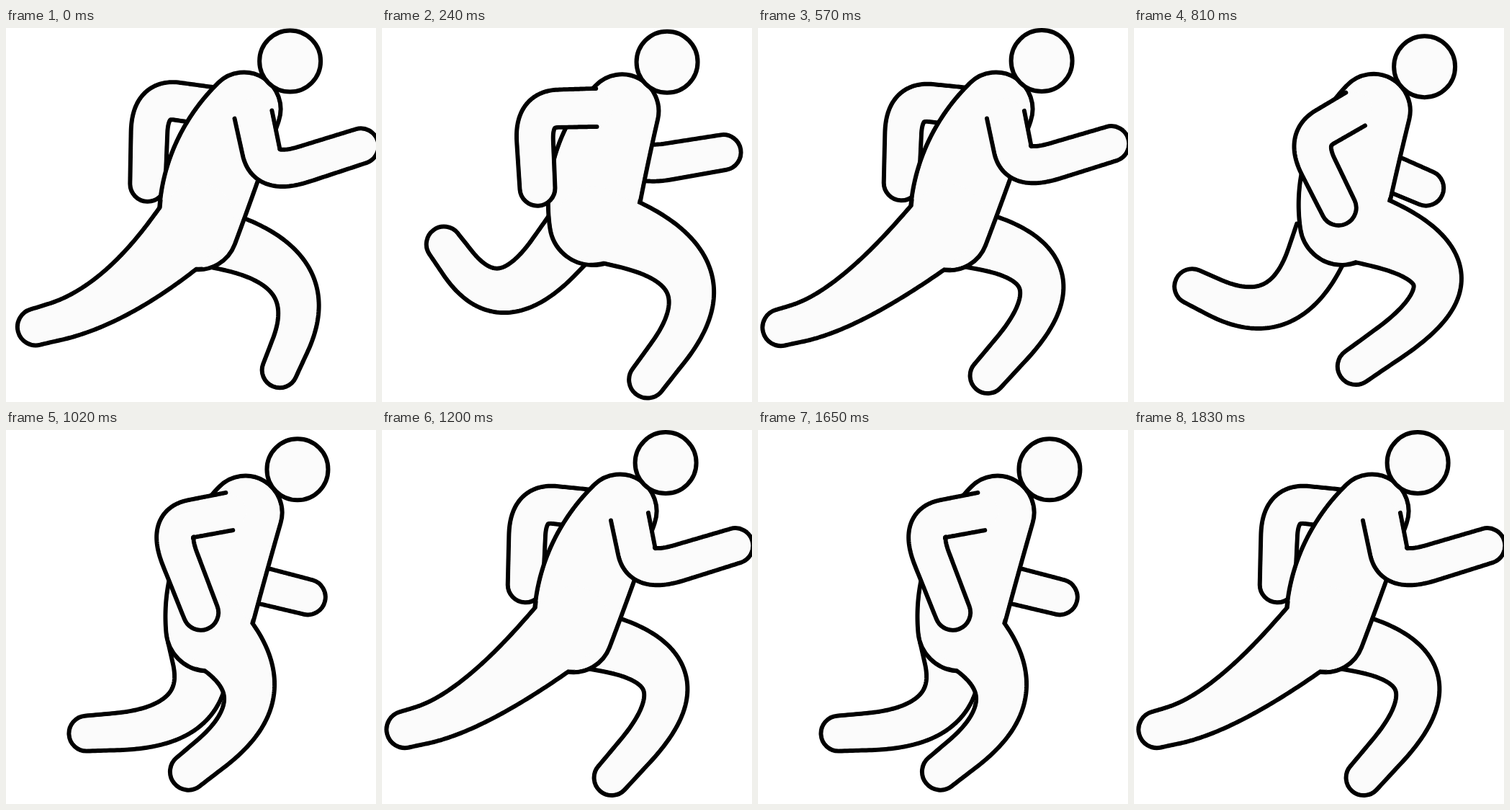
Animation, 514 px wide and 519 px high, one loop 1860 ms. Source, as an HTML page:

```html
<!DOCTYPE html>
<html lang="en">
<head>
<meta charset="utf-8">
<title>Running figure</title>
<style>
  html, body { margin: 0; width: 100%; height: 100%; overflow: hidden; background: #fff; }
  svg { display: block; width: 100%; height: 100%; }
</style>
</head>
<body>
<svg id="stage" viewBox="0 0 514 519"></svg>
<script>
const STEP = 30, LOOP_STEPS = 62, CYCLE_STEPS = 21, PHASES = 20;
const FULL_STRETCH = 19.3;   // phase at which the stride is longest
const INK = '#000', SKIN = '#fbfbfb', LINE = 6;
const SAMPLES = 90;

const angle = (phase, origin) => 2 * Math.PI * (phase - origin) / PHASES;

// A cyclic motion: a swing, a lead or lag, and a bob twice per stride.
function motionAt(phase) {
  const a = angle(phase, FULL_STRETCH);
  return (mean, swing, lead = 0, bob = 0) =>
    mean + swing * Math.cos(a) + lead * Math.sin(a) + bob * Math.cos(2 * a);
}

function trunkPose(phase) {
  const m = motionAt(phase);
  return {
    head: [m(400.5, 0, 0, -6.5), m(51, 0, 0, -5.5)],
    shoulder: [m(332, -1.5), m(114, -1.5)],
    pelvis: [m(279, -13, 4), m(276, 6, -3)],
    girth: m(57, -3)
  };
}

function armPose(phase) {
  const m = motionAt(phase);
  return [
    [m(320, 24), m(115, 5)],
    [m(272, 80, 12, 10), m(160, 52, 18, -10)],
    [m(345, 148, 17), m(220, -27, 0, -33)]
  ];
}

function nearLegPose(phase, pelvis) {
  const m = motionAt(phase);
  return [
    [pelvis[0], pelvis[1] - m(8, 8)],
    [m(338, -165, 60, -44), m(366, 24, -18)],
    [m(204, -171, 20), m(454, -39, -5)]
  ];
}

function farLegPose(phase) {
  const m = motionAt(phase);
  const kick = Math.cos(angle(phase, 0.4) / 2) ** 12;
  return [
    [266, 285],
    [m(308, 142, -33), m(387, -35, 5, -21)],
    [m(97, 4, -18) + 290 * kick, m(415, 93, -26, -28)]
  ];
}

// Samples a tapering tube; softness is the share of it taken by the bend.
function tube([root, joint, end], [r0, r1, r2], softness) {
  const straight = (1 - softness) / 2;
  const along = (t, axis) => {
    const h = root[axis], k = joint[axis], f = end[axis];
    if (t < straight) return h + 2 * t * (k - h);
    if (t > 1 - straight) return f + 2 * (1 - t) * (k - f);
    const u = (t - straight) / softness;
    return k + softness * ((1 - u) ** 2 * (h - k) + u * u * (f - k));
  };
  return Array.from({ length: SAMPLES + 1 }, (_, i) => {
    const t = i / SAMPLES, s = 1 - t;
    return { x: along(t, 0), y: along(t, 1), r: s * s * r0 + 2 * s * t * r1 + t * t * r2 };
  });
}

const pair = (x, y) => `${x.toFixed(2)} ${y.toFixed(2)}`;

// Envelope of a tube with a round end; its root is round too when closed.
function outline(samples, closed) {
  const side = sign => samples.map((p, i) => {
    const a = samples[Math.max(i - 1, 0)], b = samples[Math.min(i + 1, SAMPLES)];
    const d = Math.hypot(b.x - a.x, b.y - a.y);
    const tx = (b.x - a.x) / d, ty = (b.y - a.y) / d;
    const growth = Math.max(-0.9, Math.min(0.9, (b.r - a.r) / d));
    const across = sign * Math.sqrt(1 - growth * growth);
    return pair(p.x - p.r * (growth * tx + across * ty), p.y - p.r * (growth * ty - across * tx));
  });
  const arc = (r, to) => `A${r} ${r} 0 0 0 ${to}`;
  const left = side(1), right = side(-1).reverse();
  return `M${left.join('L')}${arc(samples[SAMPLES].r, right.join('L'))}` +
    (closed ? arc(samples[0].r, left[0]) + 'z' : '');
}

// Discs that hide the lines running through the inside of a tube.
function inside(samples) {
  return samples.map(p => {
    const r = p.r - LINE / 2 - 0.4;
    return `M${pair(p.x - r, p.y)}a${r} ${r} 0 1 0 ${2 * r} 0a${r} ${r} 0 1 0 ${-2 * r} 0z`;
  }).join('');
}

const stage = document.getElementById('stage');
function add(tag, attributes) {
  const element = document.createElementNS('http://www.w3.org/2000/svg', tag);
  for (const name in attributes) element.setAttribute(name, attributes[name]);
  return stage.appendChild(element);
}
const inked = { fill: SKIN, stroke: INK, 'stroke-width': LINE, 'stroke-linecap': 'round', 'stroke-linejoin': 'round' };

// Parts of one layer merge: all their lines lie below all their insides.
function addLayer(count) {
  const lines = Array.from({ length: count }, () => add('path', inked));
  const fills = Array.from({ length: count }, () => add('path', { fill: SKIN }));
  return parts => parts.forEach(({ samples, closed }, i) => {
    lines[i].setAttribute('d', outline(samples, closed));
    fills[i].setAttribute('d', inside(samples));
  });
}

const drawFarArm = addLayer(1), drawFarLeg = addLayer(1);
const drawBody = addLayer(2), drawNearArm = addLayer(1);
const head = add('circle', { ...inked, r: 42.5 });

const arm = phase => ({ samples: tube(armPose(phase), [26.5, 26, 24.5], 0.4) });
const leg = (joints, radii) => ({ samples: tube(joints, radii, 0.75) });

function draw(phase) {
  const { head: face, shoulder, pelvis, girth } = trunkPose(phase);
  const waist = [(shoulder[0] + pelvis[0]) / 2 - 19, (shoulder[1] + pelvis[1]) / 2 - 4];
  const torso = { samples: tube([shoulder, waist, pelvis], [51, 73, girth], 1), closed: true };

  drawFarArm([arm(phase + PHASES / 2)]);
  drawFarLeg([leg(farLegPose(phase), [42, 29, 24.5])]);
  drawBody([torso, leg(nearLegPose(phase, pelvis), [53, 28, 25.5])]);
  drawNearArm([arm(phase)]);
  head.setAttribute('cx', face[0]);
  head.setAttribute('cy', face[1]);
}

// The last pose of each cycle is held for two steps.
const start = performance.now();
let shown = -1;
function tick() {
  const step = Math.floor((performance.now() - start) / STEP) % LOOP_STEPS;
  const phase = Math.min(step % CYCLE_STEPS, PHASES - 1);
  if (phase !== shown) draw(shown = phase);
  requestAnimationFrame(tick);
}
tick();
</script>
</body>
</html>
```
